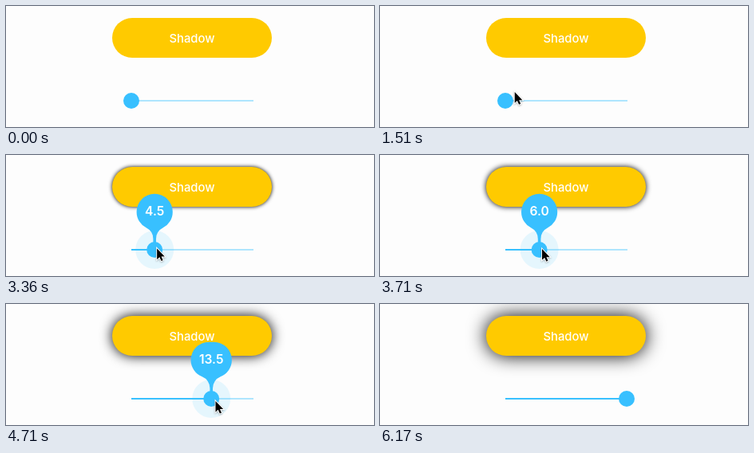
These frames come from a looping animation (461x152 px, 6.86 s). An HTML page:

```html
<!DOCTYPE html>
<html lang="en">
<head>
<meta charset="utf-8">
<title>Shadow slider</title>
<style>
  html, body { margin: 0; width: 100%; height: 100%; overflow: hidden; background: #fdfdfd; }
  #stage { position: relative; width: 461px; height: 152px; overflow: hidden; }
  #button {
    position: absolute; left: 133px; top: 15px; width: 200px; height: 50px;
    border-radius: 25px; background: #ffca00;
  }
  svg { position: absolute; left: 0; top: 0; }
  text {
    font-family: Inter, Roboto, sans-serif; font-size: 14.8px; font-weight: 500;
    fill: #fff; text-anchor: middle;
  }
  #value { font-size: 15.6px; font-weight: 600; }
  .blue { fill: #38c0ff; }
</style>
</head>
<body>
<div id="stage">
  <div id="button"></div>
  <svg width="461" height="152" viewBox="0 0 461 152">
    <text x="233" y="46">Shadow</text>
    <rect class="blue" x="157" y="118" width="153" height="2" opacity=".4"/>
    <rect id="active" class="blue" x="157" y="118" width="0" height="2"/>
    <g id="knob">
      <circle id="halo" class="blue" opacity=".12"/>
      <circle class="blue" r="10"/>
      <g id="bubble">
        <path id="drop" class="blue"/>
        <text id="value">0.0</text>
      </g>
    </g>
    <g id="cursor">
      <path d="M0 0V16L3.7 12.6L6.2 18.2L8.7 17.1L6.3 11.7H11.2Z" transform="translate(1 1) scale(.86)"
        stroke="#fff" stroke-width="2.2" paint-order="stroke"
        style="filter: drop-shadow(0 1px 1px rgba(0,0,0,.3))"/>
    </g>
  </svg>
</div>
<script>
const LOOP = 6860, MIN_X = 157, RIGHT_LIMIT = 329.8;
const PRESS = 2150, RELEASE = 5770, FADE = 100;
const LOBE_R = 22.6, LOBE_Y = -47.6, NECK_R = 15.6, NECK_X = 17.4;
const $ = id => document.getElementById(id);

const progress = (t, from, to) => Math.max(0, Math.min(1, (t - from) / (to - from)));
const easeOut = (p, power) => 1 - (1 - p) ** power;

// The drag runs slowly to 8, then faster to 20
const slowDrag = t => progress(t, 2600, 4190);
const fastDrag = t => progress(t, 4230, 5230) ** 1.15;
const thumbX = t => MIN_X + 61 * slowDrag(t) + 91 * fastDrag(t);
const valueAt = t => Math.ceil(2 * (8 * slowDrag(t) ** .85 + 12 * fastDrag(t))) / 2;

// The pointer's path is the sum of its moves
function pointer(t) {
  const enter = easeOut(progress(t, 270, 750), 2);
  const approach = progress(t, 1320, 1760);
  const slow = slowDrag(t), fast = fastDrag(t);
  const overrun = progress(t, 5230, 5580);
  const leave = progress(t, 6065, 6170);
  return [
    230 - 24 * enter - 48 * easeOut(approach, 2.8) + 63 * slow + 94 * fast + 33 * overrun + 57 * leave,
    153 - 107 * enter + 69 * easeOut(approach, 3.8) + 3 * slow + 3 * Math.sin(Math.PI * fast)
      - 4 * easeOut(overrun, 3) + 40 * leave
  ];
}

// Rounded lobe joined to the thumb by two concave neck arcs
function dropPath(shift, spread, lobeY) {
  const reach = LOBE_R + NECK_R, k = LOBE_R / reach;
  const side = s => {
    const cx = shift + s * spread, dx = s * NECK_X - cx;
    const dy = Math.sqrt(reach * reach - dx * dx), neckX = s * (NECK_X - NECK_R);
    return {
      top: `${cx} ${lobeY - LOBE_R}`, edge: `${cx + s * LOBE_R} ${lobeY}`,
      join: `${cx + dx * k} ${lobeY + dy * k}`,
      neck: `${neckX} ${lobeY + dy}`, foot: `${neckX} 0`
    };
  };
  const l = side(-1), r = side(1);
  const lobe = `A${LOBE_R} ${LOBE_R} 0 0 1 `, neck = `A${NECK_R} ${NECK_R} 0 0 0 `;
  return `M${l.foot}L${l.neck}${neck}${l.join}${lobe}${l.edge}${lobe}${l.top}` +
    `L${r.top}${lobe}${r.edge}${lobe}${r.join}${neck}${r.neck}L${r.foot}Z`;
}

function drawBubble(x, value, open) {
  $('bubble').style.display = open > 0 ? '' : 'none';
  if (open <= 0) return;
  const label = $('value');
  label.textContent = value.toFixed(1);
  const half = Math.max(LOBE_R, label.getComputedTextLength() / 2 + 10.4);
  const spread = half - LOBE_R, lobeY = LOBE_Y - spread * .35;
  const shift = Math.min(0, RIGHT_LIMIT - half - x);
  label.setAttribute('x', shift);
  label.setAttribute('y', lobeY + 4.8);
  $('drop').setAttribute('d', dropPath(shift, spread, lobeY));
  $('bubble').setAttribute('transform', `scale(${open})`);
}

function draw(t) {
  const x = thumbX(t), value = valueAt(t);
  const open = easeOut(progress(t, PRESS, PRESS + FADE), 2) * (1 - progress(t, RELEASE, RELEASE + FADE));

  $('button').style.boxShadow = value ? `0 0 ${value * 1.17}px #000` : 'none';
  $('active').setAttribute('width', x - MIN_X);
  $('knob').setAttribute('transform', `translate(${x} 119)`);
  $('halo').setAttribute('r', 24 * open);
  drawBubble(x, value, open);

  $('cursor').style.display = t > 280 && t < 6165 ? '' : 'none';
  $('cursor').setAttribute('transform', `translate(${pointer(t)})`);
}

const start = performance.now();
function tick() {
  draw((performance.now() - start) % LOOP);
  requestAnimationFrame(tick);
}
tick();
</script>
</body>
</html>
```
